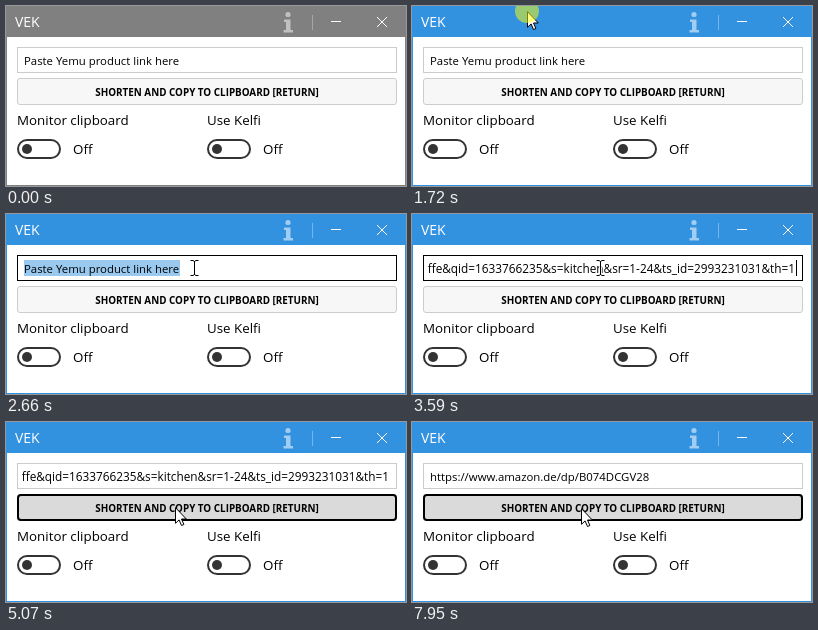
These frames come from a looping animation (400 by 180 pixels, 8000 ms). An HTML page:

```html
<!DOCTYPE html>
<html lang="en">
<head>
<meta charset="utf-8">
<title>Link shortener</title>
<style>
  html, body { margin: 0; height: 100%; overflow: hidden; background: #fff; }
  svg { display: block; width: 100vw; height: 100vh; }
  svg * { animation: 8s step-end infinite; }
  text { font: 13.35px "Open Sans", "Noto Sans", sans-serif; fill: #000; white-space: pre; }
  .title { font-size: 14px; fill: #fff; }
  .field { font-size: 11.38px; }
  .long { font-size: 11.8px; text-anchor: end; }
  .caption { font-size: 9.87px; font-weight: 700; text-anchor: middle; }
  .line { fill: none; stroke: #fff; }
  .pill { fill: #fff; stroke: #333; stroke-width: 2; }

  /* Window chrome turns from inactive grey to active blue */
  .bar { animation-name: bar; }
  .edge { fill: none; animation-name: edge; }
  .info { animation-name: info; }
  .divider { fill: none; animation-name: edge-light; }
  @keyframes bar { 0% { fill: #808080 } 21.5%, to { fill: #3392e0 } }
  @keyframes edge { 0% { stroke: #808080 } 21.5%, to { stroke: #3392e0 } }
  @keyframes info { 0% { fill: #c0c0c0 } 21.5%, to { fill: #a0cdf1 } }
  @keyframes edge-light { 0% { stroke: #a6a6a6 } 21.5%, to { stroke: #76b6ea } }

  /* Input field */
  .input { fill: #fff; animation-name: input; }
  .hint { animation-name: hint; }
  .selection { fill: #99c9ef; animation-name: selection; }
  .long { animation-name: long; }
  .short { animation-name: short; }
  .caret { animation-name: caret; }
  @keyframes input {
    0% { stroke: #ccc } 26.375% { stroke: #777 }
    31.25% { stroke: #000 } 61.625%, to { stroke: #ccc }
  }
  @keyframes hint { 0% { opacity: 1 } 44.875%, to { opacity: 0 } }
  @keyframes selection { 0% { opacity: 0 } 33.25% { opacity: 1 } 44.875%, to { opacity: 0 } }
  @keyframes long { 0% { opacity: 0 } 44.875% { opacity: 1 } 77%, to { opacity: 0 } }
  @keyframes short { 0% { opacity: 0 } 77%, to { opacity: 1 } }
  @keyframes caret {
    0% { opacity: 0 } 44.875% { opacity: 1 } 51.625% { opacity: 0 }
    57.5% { opacity: 1 } 61.625%, to { opacity: 0 }
  }

  /* Button */
  .button { stroke: #ccc; animation-name: hover; }
  .focus { fill: none; stroke: #000; stroke-width: 2; animation-name: focus; }
  @keyframes hover { 0% { fill: #f7f7f7 } 52.6875%, to { fill: #dadada } }
  @keyframes focus { 0% { opacity: 0 } 61.625%, to { opacity: 1 } }

  /* Pointer */
  .pointer { animation-name: move; }
  .arrow { fill: #fff; stroke: #000; animation-name: arrow; }
  .beam { fill: none; animation-name: beam; }
  .click { fill: #ff0; fill-opacity: .5; animation-name: click; }
  @keyframes move {
    0% { transform: translate(200px, 160px) }
    10.5% { transform: translate(200px, 160px); animation-timing-function: steps(2) }
    12.4375% { transform: translate(152px, 52px); animation-timing-function: steps(2) }
    14.375% { transform: translate(126px, 12px); animation-timing-function: steps(5) }
    19.5% { transform: translate(115px, 5px) }
    23.25% { transform: translate(119px, 10px); animation-timing-function: steps(3) }
    26.375% { transform: translate(168px, 46px); animation-timing-function: steps(3) }
    29.5% { transform: translate(188px, 54px) }
    51.625% { transform: translate(186px, 60px) }
    52.6875% { transform: translate(178px, 76px) }
    53.75% { transform: translate(169px, 85px) }
    99.375%, to { transform: translate(169px, 86px) }
  }
  @keyframes arrow {
    0% { opacity: 0 } 10.5% { opacity: 1 } 26.375% { opacity: 0 } 52.6875%, to { opacity: 1 }
  }
  @keyframes beam { 0% { opacity: 0 } 26.375% { opacity: 1 } 52.6875%, to { opacity: 0 } }
  @keyframes click {
    0% { opacity: 0 } 21.5% { opacity: 1 } 23.25% { opacity: 0 }
    31.25% { opacity: 1 } 33.25% { opacity: 0 }
    61.625% { opacity: 1 } 63.375%, to { opacity: 0 }
  }
</style>
</head>
<body>
<svg viewBox="0 0 400 180">
  <defs>
    <clipPath id="view"><rect x="16" y="42" width="369" height="24"/></clipPath>
    <g id="toggle">
      <rect class="pill" x="1" y="134" width="42" height="18" rx="9"/>
      <circle cx="10" cy="143" r="5" fill="#333"/>
      <text x="56" y="148">Off</text>
    </g>
    <path id="ibeam" d="M-3.5 -7.5H-1L.5 -6.5 2 -7.5H4.5M.5 -7V7M-3.5 7.5H-1L.5 6.5 2 7.5H4.5"/>
  </defs>

  <rect width="400" height="180" fill="#fff"/>
  <rect class="edge" x=".5" y=".5" width="399" height="179"/>
  <rect class="bar" width="400" height="31"/>
  <text class="title" x="9" y="21">VEK</text>
  <g class="info">
    <circle cx="282" cy="8.5" r="2.6"/>
    <path d="M278 13.5H284.5V24H287V26.5H277.5V24H280V16H278Z"/>
  </g>
  <path class="divider" d="M306.5 9V24"/>
  <path class="line" d="M325 15.5H335M371 11L381 21M381 11L371 21"/>

  <rect class="input" x="11.5" y="41.5" width="379" height="25"/>
  <g clip-path="url(#view)">
    <rect class="selection" x="18" y="46" width="156" height="16"/>
    <text class="field hint" x="18" y="59">Paste Yemu product link here</text>
    <text class="field long" x="383" y="59">ffe&amp;qid=1633766235&amp;s=kitchen&amp;sr=1-24&amp;ts_id=2993231031&amp;th=1</text>
    <text class="field short" x="18" y="59">https://www.amazon.de/dp/B074DCGV28</text>
    <rect class="caret" x="384" y="46" width="1" height="16"/>
  </g>

  <rect class="button" x="11.5" y="72.5" width="379" height="26" rx="2.5"/>
  <rect class="focus" x="12" y="73" width="378" height="25" rx="3"/>
  <text class="caption" x="201" y="90">SHORTEN AND COPY TO CLIPBOARD [RETURN]</text>

  <text x="11" y="119">Monitor clipboard</text>
  <text x="201" y="119">Use Kelfi</text>
  <use href="#toggle" x="11"/>
  <use href="#toggle" x="201"/>

  <g class="pointer">
    <path class="arrow" d="M.5 .7V16.3L4.1 12.9 6.5 18.5 8.9 17.5 6.5 12H11.3Z"/>
    <g class="beam">
      <use href="#ibeam" stroke="#fff" stroke-width="2.6"/>
      <use href="#ibeam" stroke="#000"/>
    </g>
    <circle class="click" r="12"/>
  </g>
</svg>
</body>
</html>
```
